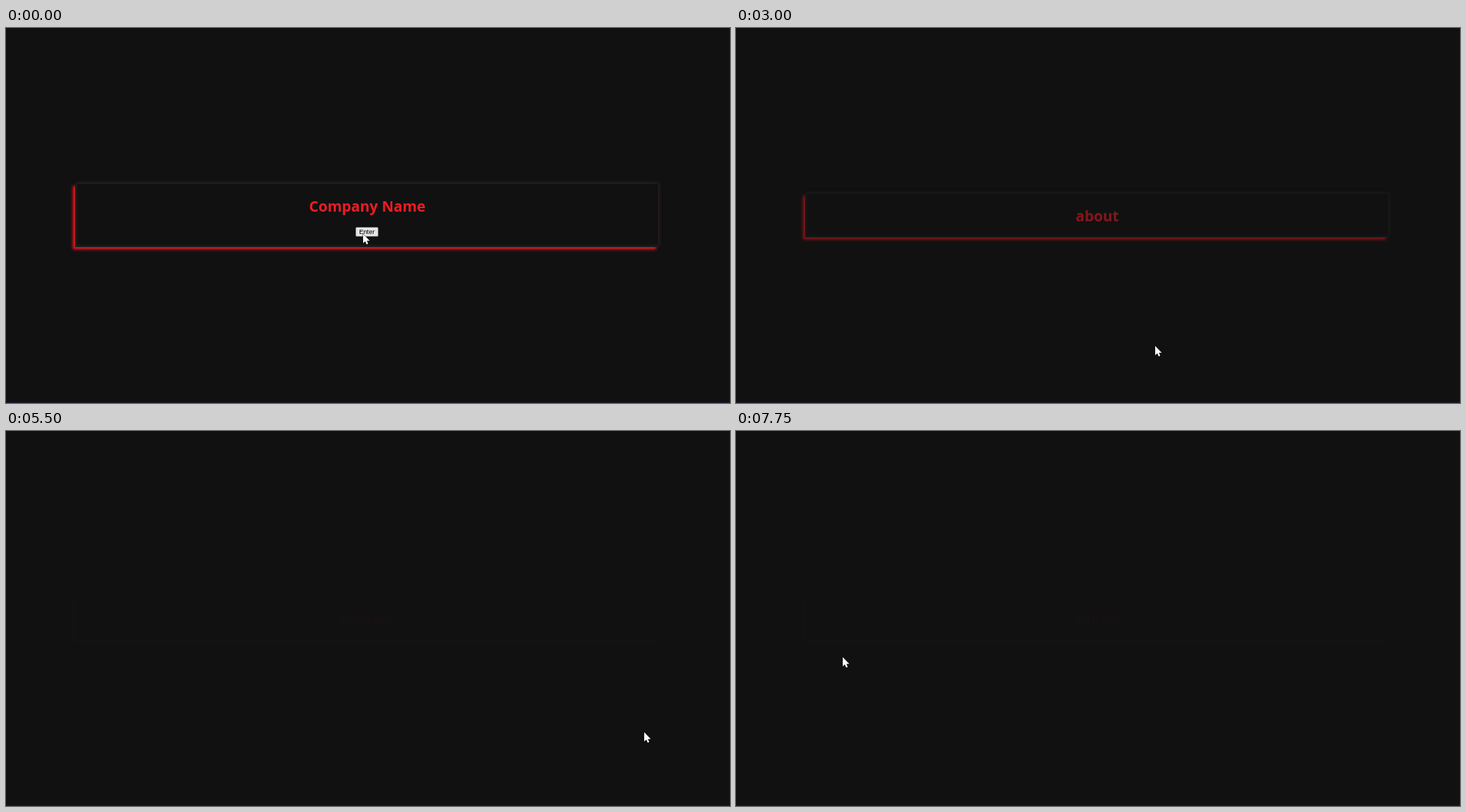
These frames come from a looping animation (1038x539 px, 8000 ms). An HTML page:

```html
<!DOCTYPE html>
<html lang="en">
<head>
<meta charset="utf-8">
<style>
  html, body { margin: 0; width: 100%; height: 100%; overflow: hidden; background: #111; }
  #stage { position: absolute; left: 0; top: 0; width: 1038px; height: 539px; overflow: hidden; }
  #stage::after {
    content: ""; position: absolute; inset: 0;
    border: solid #1a1a38; border-width: 0 0 1px; box-shadow: inset -1px 0 #16161f;
  }
  .card {
    position: absolute; left: 99px; top: 238px; width: 836px; height: 63px;
    box-shadow: -3px 3px 4px #ed1c24, 2px -2px 4px #222, inset 2px -2px 4px #222;
  }
  #welcome { top: 224px; height: 91px; }
  h2 {
    margin: 17px 0 0 2px; text-align: center; color: #ed1c24;
    font: bold 21px/30px "Open Sans", "Noto Sans", sans-serif;
  }
  button {
    position: absolute; box-sizing: border-box; height: 15px; margin: 0; padding: 0 4.2px;
    border: 1px solid #767676; border-radius: 2px; background: #efefef; color: #000;
    font: 9.333px/13px "Liberation Sans", Arial, sans-serif; white-space: nowrap;
  }
  #welcome button { left: 402px; top: 62px; height: 14px; line-height: 12px; background: #e5e5e5; }
  svg { position: absolute; left: 0; top: 0; }
  #cursor { z-index: 1; }
</style>
</head>
<body>
<div id="stage">
  <div id="menu">
    <svg width="1038" height="539">
      <rect x="152" y="76.5" width="731" height="382.5" fill="none" stroke="#f60404" stroke-width="3.5"/>
    </svg>
    <button style="left:128px;top:80px">Show About</button>
    <button style="left:850px;top:134px">Show Experience</button>
    <button style="left:128px;top:324px">Show Values</button>
    <button style="left:856px;top:432px">Show Contact</button>
  </div>
  <div class="card" id="welcome"><h2>Company Name</h2><button>Enter</button></div>
  <div class="card" id="about"><h2>about</h2></div>
  <div class="card" id="contact"><h2>contact</h2></div>
  <div class="card" id="values"><h2>values</h2></div>
  <svg id="cursor" width="1038" height="539">
    <path d="M0 0V13.2L3 10.5L5 15L7.2 14L5.3 9.7H9.4Z" fill="#fff" stroke="#111" paint-order="stroke"/>
  </svg>
</div>
<script>
  const LOOP = 8000, STEP = 250, FADE = 1000;
  const byId = id => document.getElementById(id);
  const clamp = v => Math.max(0, Math.min(1, v));

  // Each section fades in at its start and cuts back to the menu at its end.
  const sections = [
    { id: "about", start: 2480, end: 3750 },
    { id: "contact", start: 5480, end: 6750 },
    { id: "values", start: 7730, end: LOOP }
  ];
  const menuStart = 1500;

  // Pointer stops: time, x, y
  const path = [
    [0, 512, 296], [1000, 514, 294], [1250, 514, 294], [1750, 310, 169],
    [2250, 172, 86], [2500, 174, 88], [3000, 601, 457], [3750, 644, 440],
    [4000, 650, 439], [4750, 927, 432], [5000, 922, 431], [5500, 915, 433],
    [6000, 924, 419], [6500, 920, 418], [7500, 165, 328], [7750, 153, 325], [LOOP, 153, 325]
  ];
  const pointer = byId("cursor").firstElementChild;

  function pointerAt(t) {
    const next = path.findIndex(stop => stop[0] > t);
    const [t0, x0, y0] = path[next - 1], [t1, x1, y1] = path[next];
    const k = (t - t0) / (t1 - t0);
    return [x0 + (x1 - x0) * k, y0 + (y1 - y0) * k];
  }

  function draw(t) {
    byId("welcome").style.opacity = clamp(1 - (t - 250) / FADE);
    let menuVisible = t >= menuStart;
    for (const { id, start, end } of sections) {
      const active = t >= start && t < end;
      byId(id).style.opacity = active ? clamp((t - start) / FADE) : 0;
      if (active) menuVisible = false;
    }
    byId("menu").style.display = menuVisible ? "" : "none";
    pointer.setAttribute("transform", `translate(${pointerAt(t)})`);
  }

  const begin = performance.now();
  function tick() {
    const t = (performance.now() - begin) % LOOP;
    draw(Math.floor(t / STEP) * STEP);
    requestAnimationFrame(tick);
  }
  tick();
</script>
</body>
</html>
```
